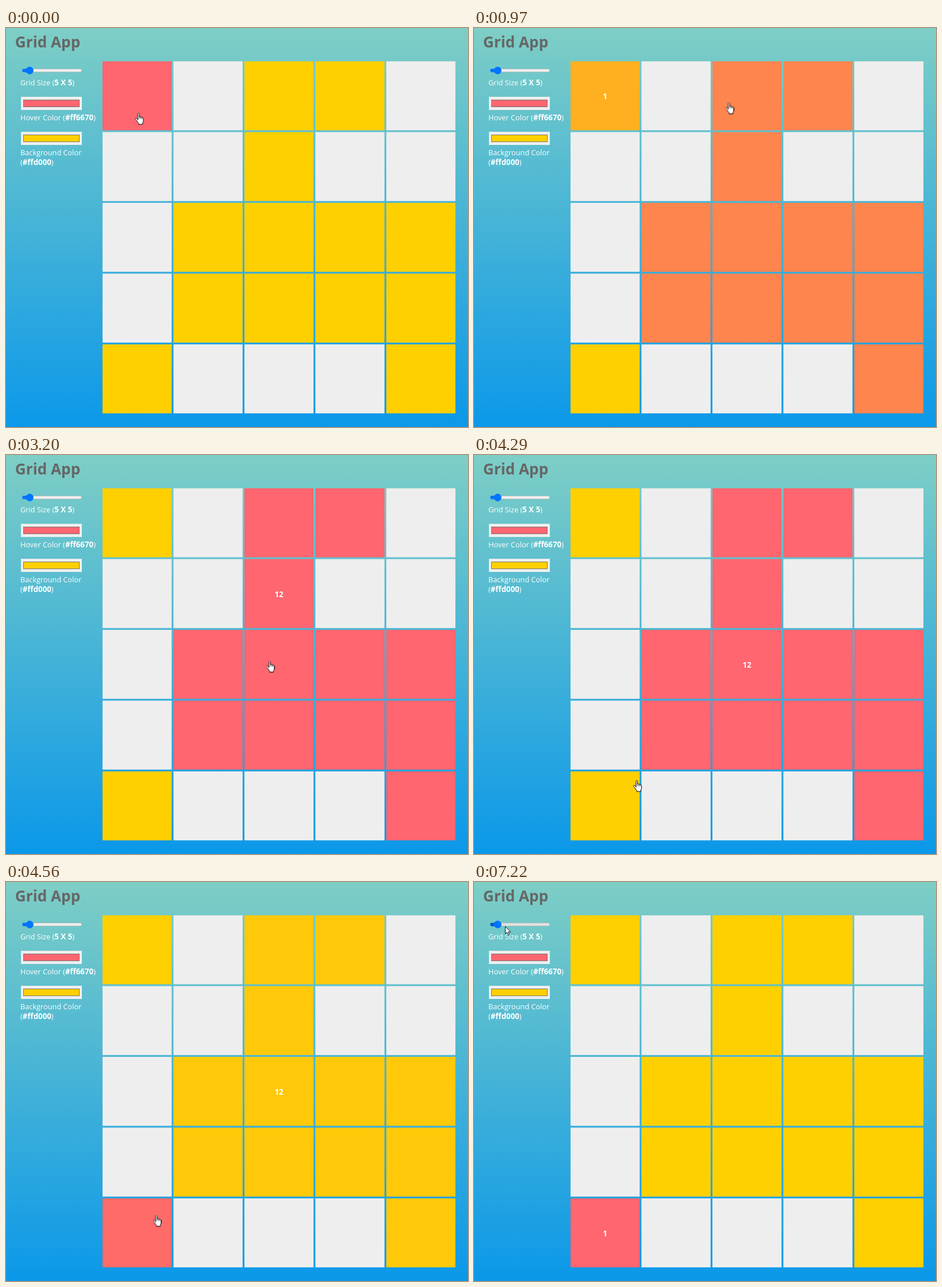
An HTML page that plays this animation: 804x696 px, repeating every 8000 ms.

```html
<!DOCTYPE html>
<html lang="en">
<head>
<meta charset="utf-8">
<title>Grid App</title>
<style>
  html, body { margin: 0; width: 100%; height: 100%; overflow: hidden; }
  svg { display: block; width: 804px; height: 696px; background: linear-gradient(#7ecec5, #0b98e9); }
  text { font: 12.75px "Open Sans", "Noto Sans", sans-serif; fill: #fff; }
  .bold { font-size: 13.3px; font-weight: 700; }
  .title { font-size: 26.2px; font-weight: 700; fill: #666; }
  .count { text-anchor: middle; opacity: 0; }

  .blank { fill: #eee; }
  .first, .shape, .corner, .count, .track, .level, .cursor, .hand, .arrow {
    animation: 8s step-end infinite;
  }
  .first { animation-name: first; }
  .shape { animation-name: shape; }
  .corner { animation-name: corner; }
  @keyframes first {
    0% { fill: #ff6670; } 12.125% { fill: #ffb020; } 13.625% { fill: #ffc909; } 19%, 100% { fill: #ffd000; }
  }
  @keyframes shape {
    0% { fill: #ffd000; } 12.125% { fill: #ff854f; } 13.625% { fill: #ff6b68; } 19% { fill: #ff6670; }
    55.5% { fill: #ffb020; } 57% { fill: #ffc909; } 62.5%, 100% { fill: #ffd000; }
  }
  @keyframes corner {
    0% { fill: #ffd000; } 55.5% { fill: #ff854f; } 57% { fill: #ff6b68; } 62.5%, 100% { fill: #ff6670; }
  }

  #count1 { animation-name: count1; }
  #count2 { animation-name: count2; }
  #count3 { animation-name: count3; }
  #count4 { animation-name: count4; }
  #count5 { animation-name: count5; }
  @keyframes count1 { 0% { opacity: 0; } 1.875% { opacity: 1; } 19%, 100% { opacity: 0; } }
  @keyframes count2 { 0% { opacity: 0; } 19% { opacity: 1; } 33%, 100% { opacity: 0; } }
  @keyframes count3 { 0% { opacity: 0; } 33% { opacity: 1; } 46.625%, 100% { opacity: 0; } }
  @keyframes count4 { 0% { opacity: 0; } 46.625% { opacity: 1; } 62.5%, 100% { opacity: 0; } }
  @keyframes count5 { 0% { opacity: 0; } 62.5%, 100% { opacity: 1; } }

  .track { animation-name: track; }
  .level { animation-name: level; }
  @keyframes track { 0% { fill: #efefef; } 81.25%, 100% { fill: #e2e2e2; } }
  @keyframes level { 0% { fill: #0075ff; } 81.25%, 100% { fill: #005cc8; } }

  .cursor { animation-name: move; }
  .cursor path { stroke: #000; fill: #fff; stroke-linejoin: round; }
  .hand { animation-name: hand; }
  .arrow { animation-name: arrow; }
  @keyframes hand { 0% { opacity: 1; } 8.375% { opacity: 0; } 10.25% { opacity: 1; } 67.875%, 100% { opacity: 0; } }
  @keyframes arrow { 0% { opacity: 0; } 8.375% { opacity: 1; } 10.25% { opacity: 0; } 67.875%, 100% { opacity: 1; } }
  @keyframes move {
    0% { transform: translate(224.5px, 148px); }
    6.875% { transform: translate(268px, 141px); }
    8.375% { transform: translate(335px, 130px); }
    10.25% { transform: translate(427.5px, 127.5px); }
    12.125% { transform: translate(437.5px, 129.5px); }
    13.625% { transform: translate(452px, 132px); }
    27.625% { transform: translate(451px, 196px); }
    29.5% { transform: translate(451px, 224px); }
    36.5% { transform: translate(449px, 285px); }
    38.125% { transform: translate(451px, 344px); }
    40% { transform: translate(452.5px, 358.5px); }
    52% { transform: translate(365px, 468px); }
    53.625% { transform: translate(277px, 567px); }
    55.5% { transform: translate(257.5px, 580px); }
    57% { transform: translate(255.5px, 580.5px); }
    67.875% { transform: translate(213px, 535px); }
    69.5% { transform: translate(112px, 410px); }
    71% { transform: translate(73px, 328px); }
    72.875% { transform: translate(69px, 320px); }
    76.375% { transform: translate(83px, 250px); }
    78% { transform: translate(77px, 192px); }
    79.75% { transform: translate(72px, 135px); }
    81.25% { transform: translate(66px, 96px); }
    83.25% { transform: translate(62px, 87px); }
    85.125% { transform: translate(58px, 81px); }
    86.75% { transform: translate(55px, 77px); }
    90.25%, 100% { transform: translate(54px, 77px); }
  }
</style>
</head>
<body>
<svg viewBox="0 0 804 696">
  <text class="title" x="15.8" y="34">Grid App</text>

  <rect class="track" x="28.4" y="71.4" width="103.2" height="5.4" rx="2.7" stroke="#b2b2b2" stroke-width=".8"/>
  <path class="level" d="M41 71H31.3a3.1 3.1 0 0 0 0 6.2H41z"/>
  <circle cx="41.2" cy="74.1" r="6.6" fill="#0075ff"/>
  <text x="25" y="100">Grid Size (<tspan class="bold">5 X 5</tspan>)</text>

  <rect x="26" y="120" width="106" height="23" fill="#efefef"/>
  <rect x="30.5" y="125.5" width="97" height="12" fill="#ff6670" stroke="#777"/>
  <text x="25" y="161">Hover Color (<tspan class="bold">#ff6670</tspan>)</text>

  <rect x="26" y="181" width="106" height="23" fill="#efefef"/>
  <rect x="30.5" y="186.5" width="97" height="12" fill="#ffd000" stroke="#777"/>
  <text x="25" y="222">Background Color</text>
  <text x="25" y="239">(<tspan class="bold">#ffd000</tspan>)</text>

  <g id="grid"></g>

  <text class="bold count" id="count1" x="228" y="124">1</text>
  <text class="bold count" id="count2" x="475" y="124">12</text>
  <text class="bold count" id="count3" x="475" y="247.7">12</text>
  <text class="bold count" id="count4" x="475" y="371">12</text>
  <text class="bold count" id="count5" x="228" y="618">1</text>

  <g class="cursor">
    <g class="hand">
      <path d="M5 12.4V2.2C5 0 7.6 0 7.6 2.2V7.2C8 6 10 6.2 10 7.8 10.4 6.8 12.2 7 12.2 8.5 12.8 7.7 14.5 8.2 14.5 9.8V14C14.5 16 13.2 16.6 13.2 18V20H6.2V18.4C5 17 4 15 2.6 13.2 1.6 12 .6 11.4 .6 10.4 .6 9 2.4 8.8 3.4 10Z"/>
      <path d="M7.6 7.2V10.3M10 7.8V10.6M12.2 8.5V10.9" stroke-width=".8"/>
    </g>
    <path class="arrow" stroke-width=".9" d="M.5 .6V13.6L3.4 10.8 5.4 15.6 7.5 14.7 5.5 10.1H9.7Z"/>
  </g>
</svg>
<script>
  const layout = ["f.ss.", "..s..", ".ssss", ".ssss", "c...s"];
  const kinds = { ".": "blank", f: "first", s: "shape", c: "corner" };
  const pitch = 123.45, size = 120.3;

  document.getElementById("grid").innerHTML = layout.map((row, y) =>
    [...row].map((kind, x) =>
      `<rect class="${kinds[kind]}" x="${168 + x * pitch}" y="${58.1 + y * pitch}" width="${size}" height="${size}"/>`
    ).join("")
  ).join("");
</script>
</body>
</html>
```
